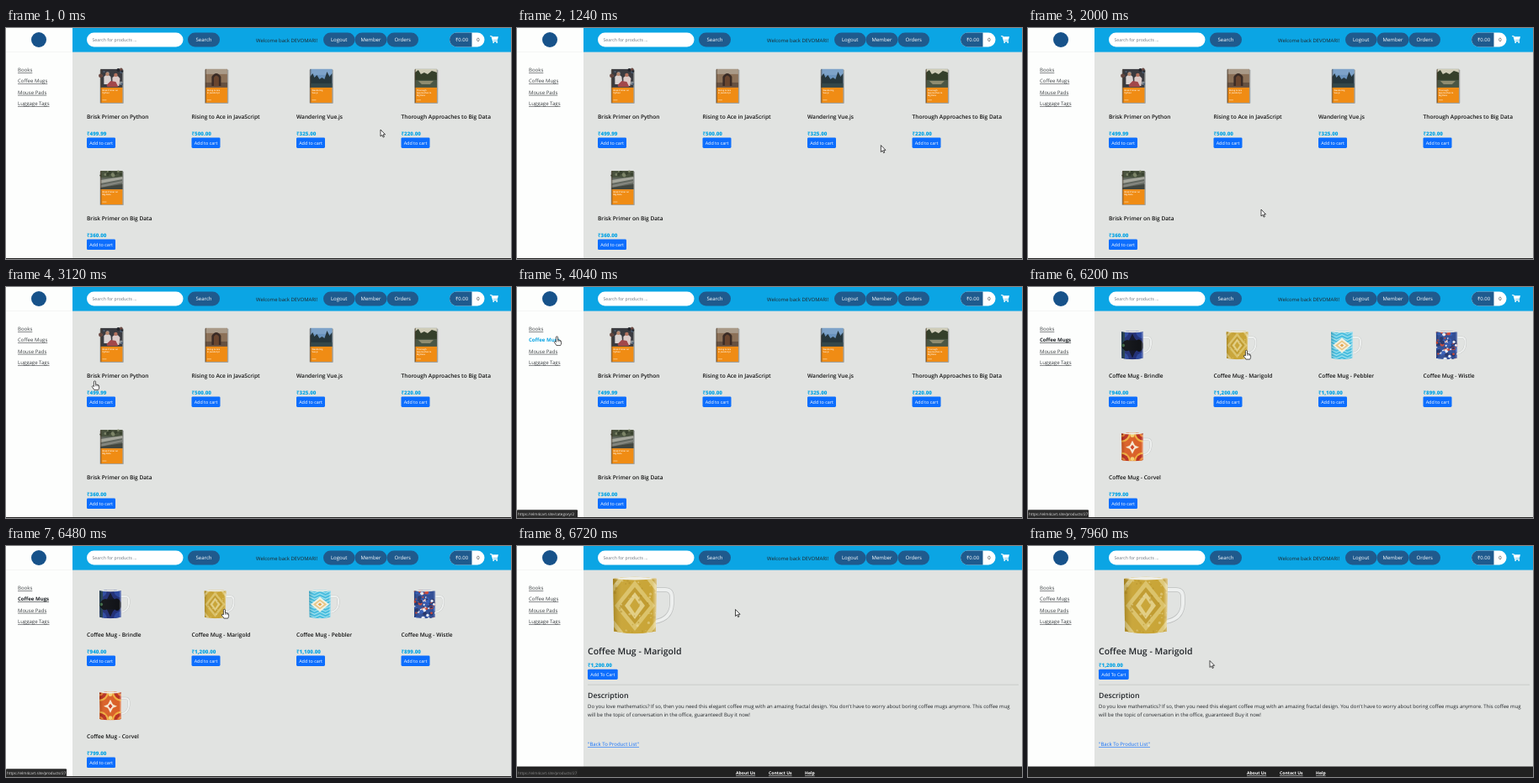
Recreate the animation shown at these times as an HTML page. Size 600x275 px, loop 8000 ms.

```html
<!DOCTYPE html>
<html lang="en">
<head>
<meta charset="utf-8">
<title>Shop tour</title>
<style>
html, body { margin: 0; width: 100%; height: 100%; overflow: hidden; background: #e1e3e1; }
svg { display: block; width: 100vw; height: 100vh; }
text { font-family: "Open Sans", "Noto Sans", sans-serif; text-rendering: geometricPrecision; white-space: pre; }
</style>
</head>
<body>
<svg id="stage" viewBox="0 0 600 275" xmlns="http://www.w3.org/2000/svg"></svg>
<script>
const LOOP = 8000, STEP = 40;
const SKY = '#0ba5e4', NAVY = '#1f5a8d', BLUE = '#0d6efd', INK = '#212529', DARK = '#212121';

// Markup helpers
const rect = (x, y, w, h, fill, r = 0, more = '') =>
  `<rect x="${x}" y="${y}" width="${w}" height="${h}" rx="${r}" fill="${fill}" ${more}/>`;
const shape = (d, fill, more = '') => `<path d="${d}" fill="${fill}" ${more}/>`;
const dot = (x, y, r, fill, more = '') => `<circle cx="${x}" cy="${y}" r="${r}" fill="${fill}" ${more}/>`;
const text = (x, y, size, str, fill = INK, more = '') =>
  `<text x="${x}" y="${y}" font-size="${size}" fill="${fill}" ${more}>${str}</text>`;
const group = (x, y, body, scale = 1) => `<g transform="translate(${x} ${y}) scale(${scale})">${body}</g>`;
const diamond = (x, y, w, h, fill) => shape(`M${x - w},${y}L${x},${y - h}L${x + w},${y}L${x},${y + h}Z`, fill);
const MID = 'text-anchor="middle"', LINE = 'text-decoration="underline"';
const BOLD = 'font-weight="700"', SEMI = 'font-weight="600"';

function seeded(seed) {
  return () => (seed = (seed * 16807) % 2147483647) / 2147483647;
}

function scatter(n, seed, w, h, size, colors) {
  const rnd = seeded(seed);
  let out = '';
  for (let i = 0; i < n; i++) {
    out += dot((rnd() * w).toFixed(1), (rnd() * h).toFixed(1), (size * (0.5 + rnd())).toFixed(1), colors[i % colors.length]);
  }
  return out;
}

function wrap(str, max) {
  return str.split(' ').reduce((lines, word) => {
    const last = lines[lines.length - 1];
    if (last && last.length + word.length < max) lines[lines.length - 1] = last + ' ' + word;
    else lines.push(word);
    return lines;
  }, []);
}

// Cover pictures, 26 by 22
const photos = [
  rect(0, 0, 26, 22, '#3a3b40') + scatter(16, 41, 26, 20, 1.6, ['#6b4a44', '#23252b', '#8a8f95', '#4c5f74']) +
    shape('M4,9Q8,4 12,9L13,18H4Z', '#d9d3d2') + shape('M14,10Q19,5 23,11L22,20H14Z', '#dccbc8') +
    dot(8, 6, 2.2, '#b9896f') + dot(18, 7, 2.2, '#b5735f') + shape('M7,19L12,14L18,15L21,21H8Z', '#a2474a'),
  rect(0, 0, 26, 22, '#8c7158') + rect(0, 0, 26, 6, '#a99a88') + rect(0, 16, 26, 6, '#665141') +
    shape('M7.5,20V9Q13,1 18.5,9V20Z', '#3a2b25') + shape('M10,20V10Q13,5 16,10V20Z', '#69452f'),
  rect(0, 0, 26, 22, '#6a93bd') + rect(0, 0, 26, 7, '#7ea3c9') +
    shape('M0,22V9L3,5L5,10L8,7L11,12L14,10L17,12L20,3L23,9L26,5V22Z', '#26363c') + rect(0, 17, 26, 5, '#34474a'),
  rect(0, 0, 26, 22, '#3c4733') + rect(0, 0, 26, 7, '#cfcdb9') +
    shape('M0,13V4L4,1L7,6L11,4L15,6L20,2L26,4V13Z', '#35402b') + rect(0, 13, 26, 9, '#4a5644') +
    shape('M4,14H22L18,18H8Z', '#8f8c70'),
  rect(0, 0, 26, 22, '#62675f') + rect(0, 0, 26, 8, '#4a533f') + scatter(14, 7, 26, 6, 1.4, ['#39422f', '#7c8467']) +
    shape('M0,11L26,7V10L0,15Z', '#a5a69c') + shape('M0,17L26,12V14L0,20Z', '#84867f') + shape('M0,20L26,16V22H0Z', '#42463f')
];

const book = (i, title) =>
  rect(-0.8, 0.7, 28.2, 40.3, '#6d6f6d', 0.8, 'opacity=".55"') + photos[i] +
  rect(0, 22, 26, 18, '#f08c14') + rect(0, 0, 0.9, 40, '#4b3a28', 0, 'opacity=".65"') +
  wrap(title, 15).map((line, n) => text(2, 26 + n * 3.2, 2.5, line, '#fff', SEMI)).join('') +
  rect(2, 36.6, 5, 0.7, '#fbd9a8');

// Mug prints, 26 by 34
const corners = (fn) => [[0, 0], [26, 0], [0, 34], [26, 34]].map(([x, y]) => fn(x, y)).join('');
const bands = Array.from({ length: 11 }, (_, i) =>
  shape(`M0,${i * 3.6 - 3}l6.5,3l6.5,-3l6.5,3l6.5,-3`, 'none', 'stroke="#9be0ee" stroke-width="1.1"')).join('');
const prints = [
  rect(0, -1, 26, 36, '#16256f') + corners((x, y) => dot(x, y, 9, '#23409a')) + rect(0, 0, 4, 34, '#1d3a4c') +
    shape('M0,17Q4,9 9,11Q13,5 18,11Q22,8 26,15V20Q22,27 18,23Q13,30 9,23Q4,26 0,18Z', '#04060b') +
    shape('M9,11L13,3L17,11ZM9,23L13,32L17,23Z', '#060a20') + dot(2, 17, 2, '#3d6b45'),
  rect(0, -1, 26, 36, '#c6a02c') + diamond(13, 17, 12, 15, '#d9bf62') + diamond(13, 17, 9, 11, '#bd9625') +
    diamond(13, 17, 6, 8, '#e0cb7d') + diamond(13, 17, 3, 4.5, '#c6a02c') +
    corners((x, y) => diamond(x, y, 7, 9, '#dcc572') + diamond(x, y, 4, 5, '#bb9321')) +
    `<g opacity=".45">${scatter(50, 97, 26, 34, 0.55, ['#efe2ab', '#a98217'])}</g>`,
  rect(0, -1, 26, 36, '#3fb9dc') + bands + diamond(13, 17, 11, 9, '#eef0df') + diamond(13, 17, 8, 6, '#e9c27c') +
    diamond(13, 17, 5, 4, '#f4efe0') + diamond(13, 17, 2.4, 2, '#e2a347'),
  rect(0, -1, 26, 36, '#27458f') + scatter(80, 23, 26, 34, 1.6, ['#c8402d', '#e4e6ef', '#2b55b4', '#1b2a63']),
  rect(0, -1, 26, 36, '#d8581c') + corners((x, y) => dot(x, y, 11, '#f0ab35') + dot(x, y, 9, '#b52718') + dot(x, y, 5, '#e87e2b') + dot(x, y, 2.5, '#8f1d1b')) +
    diamond(13, 17, 4, 8, '#f4e5cd') + diamond(13, 17, 8, 3.4, '#f4e5cd') + diamond(13, 17, 2.4, 3, '#cf3b1c') +
    dot(13, 3, 2.4, '#f3cf6a') + dot(13, 31, 2.4, '#f3cf6a')
];

const MUG = 'M0,1Q13,-1.2 26,1L25.4,32.3Q13,35 .6,32.3Z';
const HANDLE = 'M25,7.5H31Q35,7.5 35,12V16Q34.5,25 25,26.5';
const mug = (i) =>
  shape(HANDLE, 'none', 'stroke="#bfc1c0" stroke-width="2.7"') + shape(HANDLE, 'none', 'stroke="#edefee" stroke-width="2"') +
  shape(MUG, '#eee') + `<g clip-path="url(#cup)">${prints[i]}${rect(0, -1, 26, 36, 'url(#shade)')}</g>` +
  shape('M0,1Q13,-1.2 26,1Q13,2.4 0,1Z', '#efeee6');

const button = (x, y, w, h, label) => rect(x, y, w, h, BLUE, 1.4) + text(x + w / 2, y + h / 2 + 1.9, 5.4, label, '#fff', MID);
const price = (x, y, amount) => text(x, y, 6.2, '₹' + amount, SKY, 'font-weight="800"');

function grid(items, picture) {
  return items.map(([title, amount], i) => {
    const x = 96 + (i % 4) * 124.5, y = Math.floor(i / 4) * 121.2;
    return group(x, y, picture(i, title) + text(0, 108, 6.58, title, '#111', SEMI) +
      price(0, 128, amount) + button(0, 130.4, 34, 12.5, 'Add to cart'));
  }).join('');
}

const books = grid([
  ['Brisk Primer on Python', '499.99'], ['Rising to Ace in JavaScript', '500.00'], ['Wandering Vue.js', '325.00'],
  ['Thorough Approaches to Big Data', '220.00'], ['Brisk Primer on Big Data', '360.00']
], (i, title) => group(16.4, 48.9, book(i, title)));

const mugs = grid([
  ['Coffee Mug - Brindle', '940.00'], ['Coffee Mug - Marigold', '1,200.00'], ['Coffee Mug - Pebbler', '1,100.00'],
  ['Coffee Mug - Wistle', '899.00'], ['Coffee Mug - Corvel', '799.00']
], (i) => group(15, 52.5, mug(i)));

const product = group(114, 37, mug(1), 2) +
  text(84, 129, 10.5, 'Coffee Mug - Marigold', INK, SEMI) + price(84, 144.3, '1,200.00') +
  button(84, 146.8, 35.7, 12.2, 'Add To Cart') + rect(84, 164.8, 512, 0.6, '#b9bbb9') +
  text(84, 181, 8.75, 'Description', INK, SEMI) +
  text(84, 193.3, 6.03, 'Do you love mathematics? If so, then you need this elegant coffee mug with an amazing fractal design. You don\'t have to worry about boring coffee mugs anymore. This coffee mug') +
  text(84, 203.2, 6.03, 'will be the topic of conversation in the office, guaranteed! Buy it now!') +
  text(84, 238.2, 6.03, '"Back To Product List"', BLUE, LINE) + rect(0, 262.5, 600, 12.5, DARK) +
  [[260, 'About Us'], [299, 'Contact Us'], [342, 'Help']]
    .map(([x, label]) => text(x, 272.3, 5.1, label, '#fff', `${BOLD} ${LINE}`)).join('');

const pill = (x, w, label) => rect(x, 5.6, w, 17, NAVY, 8.5) + text(x + w / 2, 16.3, 6.03, label, '#fff', MID);
const cart = shape('M575,9.8H577L578.7,15.6H584', 'none', 'stroke="#fff" stroke-width="1.1"') +
  shape('M577,10.2H585L583.8,14.4H578.2Z', '#fff') + dot(579.2, 17.2, 0.9, '#fff') + dot(583.2, 17.2, 0.9, '#fff');
const header = rect(79, 0, 521, 28.6, SKY) + rect(96, 5.6, 114.5, 17, '#fff', 8.5) +
  text(102.5, 16, 5.2, 'Search for products ...', '#6c757d') + pill(216, 38, 'Search') +
  text(297, 16.5, 5.95, 'Welcome back DEVOMARI!') +
  pill(377, 37.5, 'Logout') + pill(414.5, 38, 'Member') + pill(452.5, 37.5, 'Orders') +
  rect(527, 5.6, 41.5, 17, '#fff', 8.5) + shape('M553.5,5.6H535.5A8.5,8.5 0 0 0 535.5,22.6H553.5Z', NAVY) +
  text(541.5, 16.3, 5.9, '₹0.00', '#fff', MID) + text(561, 16.3, 5.9, '0', INK, MID) + cart;

const menuItem = (y, label, fill = '#3c4043', more = LINE) => text(14, y, 6.05, label, fill, more);
const sidebar = rect(0, 0, 79, 274, '#fdfefd') + rect(0, 28.4, 79, 0.5, '#ebecea') + dot(39, 14, 9, '#17528a') +
  menuItem(52, 'Books') + menuItem(78.8, 'Mouse Pads') + menuItem(92.2, 'Luggage Tags') + '<g id="link"></g>';

const hand = shape('M-1.1,6.2V.9A1.05,1.05 0 0 1 1,.9V4L2.6,4.2Q5.2,4.5 5.1,6.3V8Q4.9,9.4 4.2,10.6H-.6Q-1.4,9 -2.9,7.4Q-3.7,6.1 -2.6,5.7Q-1.8,5.6 -1.1,6.6Z',
  '#fff', 'stroke="#111" stroke-width=".7" stroke-linejoin="round"') +
  shape('M1,4V6.3M2.5,4.4V6.4M3.9,4.8V6.5', 'none', 'stroke="#111" stroke-width=".45"');
const arrow = shape('M0,0V8L1.9,6.3L3.2,9.1L4.4,8.5L3.2,5.8H5.6Z', '#fff', 'stroke="#111" stroke-width=".75" stroke-linejoin="round"');

const $ = (id) => document.getElementById(id);
$('stage').innerHTML =
  `<defs><clipPath id="cup"><path d="${MUG}"/></clipPath>
  <linearGradient id="shade"><stop offset="0" stop-color="#000" stop-opacity=".16"/><stop offset=".2" stop-color="#fff" stop-opacity=".08"/>
  <stop offset=".9" stop-color="#fff" stop-opacity=".05"/><stop offset="1" stop-color="#fff" stop-opacity=".55"/></linearGradient></defs>` +
  rect(0, 0, 600, 275, '#e1e3e1') + header + sidebar + rect(0, 274, 600, 1, DARK) +
  `<g id="books">${books}</g><g id="mugs">${mugs}</g><g id="product">${product}</g>
  <g id="status">${rect(0, 265.3, 72, 9.7, '#2b2b2b', 1)}<text id="url" x="1" y="271.9" font-size="4.55" fill="#e4e4e4"></text></g>
  <g id="cursor"><g id="arrow">${arrow}</g><g id="hand">${hand}</g></g>`;

// Pointer path: time, x, y
const path = [
  [0, 445, 121], [1000, 445, 121], [1400, 424, 152], [1840, 338, 213], [2000, 277, 216], [2280, 196, 178],
  [2600, 122, 128], [2720, 122, 128], [3120, 105.5, 112], [3240, 93, 99], [3520, 47.5, 59], [5280, 47.5, 59],
  [5480, 84, 62], [5840, 222, 73], [6040, 259.5, 75.5], [7200, 259.5, 75.5], [7360, 301, 131],
  [7880, 301, 131], [7960, 216, 136.5], [8000, 216, 136.5]
];
const handTimes = [[2880, 3240], [3480, 5360], [5880, 6720]];

function pointAt(t) {
  const i = path.findIndex((p) => p[0] > t);
  const [t0, x0, y0] = path[i - 1], [t1, x1, y1] = path[i];
  const k = (t - t0) / (t1 - t0);
  return [x0 + (x1 - x0) * k, y0 + (y1 - y0) * k];
}

const show = (id, on) => $(id).setAttribute('display', on ? 'inline' : 'none');
const within = (t, a, b) => t >= a && t < b;

function link(t) {
  if (within(t, 3520, 5360)) return menuItem(65.4, 'Coffee Mugs', SKY, BOLD);
  if (within(t, 5360, 6520)) return menuItem(65.4, 'Coffee Mugs', INK, `${BOLD} ${LINE}`);
  return menuItem(65.4, 'Coffee Mugs');
}

function update(time) {
  const t = Math.floor((time % LOOP) / STEP) * STEP;
  show('books', t < 4080);
  show('mugs', within(t, 4080, 6520));
  show('product', t >= 6520);
  $('link').innerHTML = link(t);

  show('status', within(t, 3600, 5400) || within(t, 5960, 6920));
  $('status').setAttribute('opacity', t < 6680 ? 1 : Math.max(0, 0.55 - (t - 6720) / 400));
  $('url').textContent = 'https://elm4cart.site/' + (t < 5400 ? 'category/2' : 'products/27');

  const pointing = handTimes.some(([a, b]) => within(t, a, b));
  show('hand', pointing);
  show('arrow', !pointing);
  $('cursor').setAttribute('transform', `translate(${pointAt(t).join(' ')})`);
}

const start = performance.now();
function frame() {
  update(performance.now() - start);
  requestAnimationFrame(frame);
}
frame();
</script>
</body>
</html>
```
